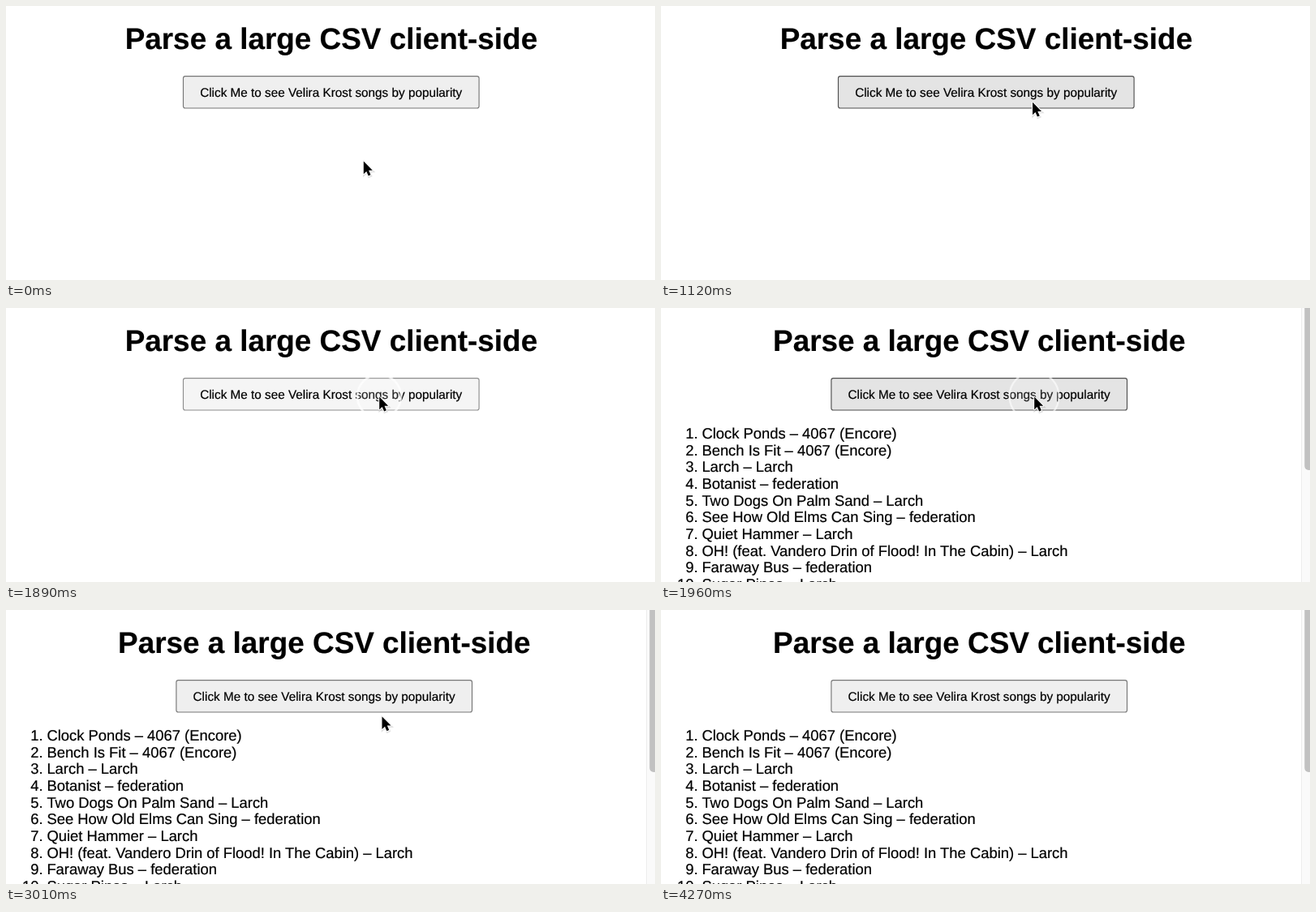
These frames come from a looping animation (800x338 px, 4970 ms). An HTML page:

```html
<!DOCTYPE html>
<html lang="en">
<head>
<meta charset="utf-8">
<title>Parse a large CSV client-side</title>
<style>
  html, body { margin: 0; width: 100%; height: 100%; overflow: hidden; background: #fff; }
  svg { display: block; width: 100vw; height: 100vh; }
  text {
    font-family: "Liberation Sans", Arial, Helvetica, sans-serif;
    fill: #000; stroke: #000; stroke-width: .2px; white-space: pre;
    text-rendering: geometricPrecision;
  }
  .title { font-size: 36.9px; font-weight: 700; text-anchor: middle; }
  .label { font-size: 15.3px; text-anchor: middle; }
  .list text { font-size: 18.4px; }
  .list .num { text-anchor: end; }
</style>
</head>
<body>
<svg viewBox="0 0 800 338">
  <rect width="800" height="338" fill="#fff"/>
  <g id="head">
    <text class="title" x="400.9" y="53.3">Parse a large CSV client-side</text>
    <rect id="button" x="218.5" y="86.6" width="364.6" height="39.4" rx="2.5" stroke-width="1.15"/>
    <text class="label" x="400.7" y="111.9">Click Me to see Velira Krost songs by popularity</text>
  </g>
  <g id="results">
    <g id="list" class="list"></g>
    <rect x="789" y="0" width="11" height="338" fill="#fafafa"/>
    <rect x="789" y="0" width="1" height="338" fill="#ededed"/>
    <rect x="793.3" y="-10" width="10" height="210" rx="5" fill="#c1c1c1"/>
  </g>
  <circle id="ring" fill="#fff" stroke="#fff"/>
  <g id="cursor">
    <path d="M0 0V15.6L3.5 12.3L5.9 17.9L8.7 16.7L6.3 11.2H11Z" transform="translate(.5 1.2)"
      fill="#000" stroke="#000" stroke-width="2.5" opacity=".12"/>
    <path d="M0 0V15.6L3.5 12.3L5.9 17.9L8.7 16.7L6.3 11.2H11Z"
      fill="#000" stroke="#fff" stroke-width="2" stroke-linejoin="round" paint-order="stroke"/>
  </g>
</svg>
<script>
const LOOP = 4970, STEP = 70;
const CLICK = 1750, LOADED = 1960, LEAVE = 2940;
const SCROLLBAR_SHIFT = -8.6;
const START = [440.8, 191.6], TARGET = [460.2, 109.6], EXIT = [490, 306];
const LOOKS = {
  normal: ["#efefef", "#767676"],
  hover: ["#e4e4e4", "#4f4f4f"],
  active: ["#f5f5f5", "#8d8d8d"]
};
const SONGS = [
  "Clock Ponds – 4067 (Encore)",
  "Bench Is Fit – 4067 (Encore)",
  "Larch – Larch",
  "Botanist – federation",
  "Two Dogs On Palm Sand – Larch",
  "See How Old Elms Can Sing – federation",
  "Quiet Hammer – Larch",
  "OH! (feat. Vandero Drin of Flood! In The Cabin) – Larch",
  "Faraway Bus – federation",
  "Sugar Pines – Larch"
];

const $ = id => document.getElementById(id);
const [head, button, results, list, ring, cursor] =
  ["head", "button", "results", "list", "ring", "cursor"].map($);

function set(el, attrs) {
  for (const key in attrs) el.setAttribute(key, attrs[key]);
}

function addText(content, attrs) {
  const el = document.createElementNS("http://www.w3.org/2000/svg", "text");
  el.textContent = content;
  set(el, attrs);
  list.append(el);
}

SONGS.forEach((song, i) => {
  const y = 161 + i * 20.65;
  addText(`${i + 1}.`, { class: "num", x: 45.6, y });
  addText(song, { x: 50.4, y });
});

const clamp = v => Math.min(1, Math.max(0, v));
const mix = (a, b, k) => a.map((v, i) => v + (b[i] - v) * k);

function cursorAt(t) {
  if (t < LEAVE) {
    const u = clamp((t - 840) / 420);
    return mix(START, TARGET, 1 - (1 - u) ** 2);
  }
  const u = clamp((t - LEAVE) / 210);
  return mix(TARGET, EXIT, u * u);
}

function draw(time) {
  const t = Math.floor((time % LOOP) / STEP) * STEP;
  const loaded = t >= LOADED;
  const [x, y] = cursorAt(t);

  const state = y > 126 ? "normal" : t >= CLICK && !loaded ? "active" : "hover";
  const [fill, stroke] = LOOKS[state];
  set(button, { fill, stroke });
  set(head, { transform: `translate(${loaded ? SCROLLBAR_SHIFT : 0} 0)` });
  set(results, { visibility: loaded ? "visible" : "hidden" });

  set(cursor, {
    transform: `translate(${x} ${y})`,
    visibility: t < 3220 ? "visible" : "hidden"
  });

  const u = (t - CLICK) / 560;
  const clicking = u >= 0 && u < 1;
  set(ring, { visibility: clicking ? "visible" : "hidden" });
  if (clicking) {
    set(ring, {
      cx: 460, cy: 109, r: 20 + 28 * u,
      "stroke-width": 3.2 - 2.6 * u,
      "fill-opacity": 0.2 * (1 - u),
      "stroke-opacity": 1 - u
    });
  }
}

function tick() {
  draw(performance.now());
  requestAnimationFrame(tick);
}
tick();
</script>
</body>
</html>
```
